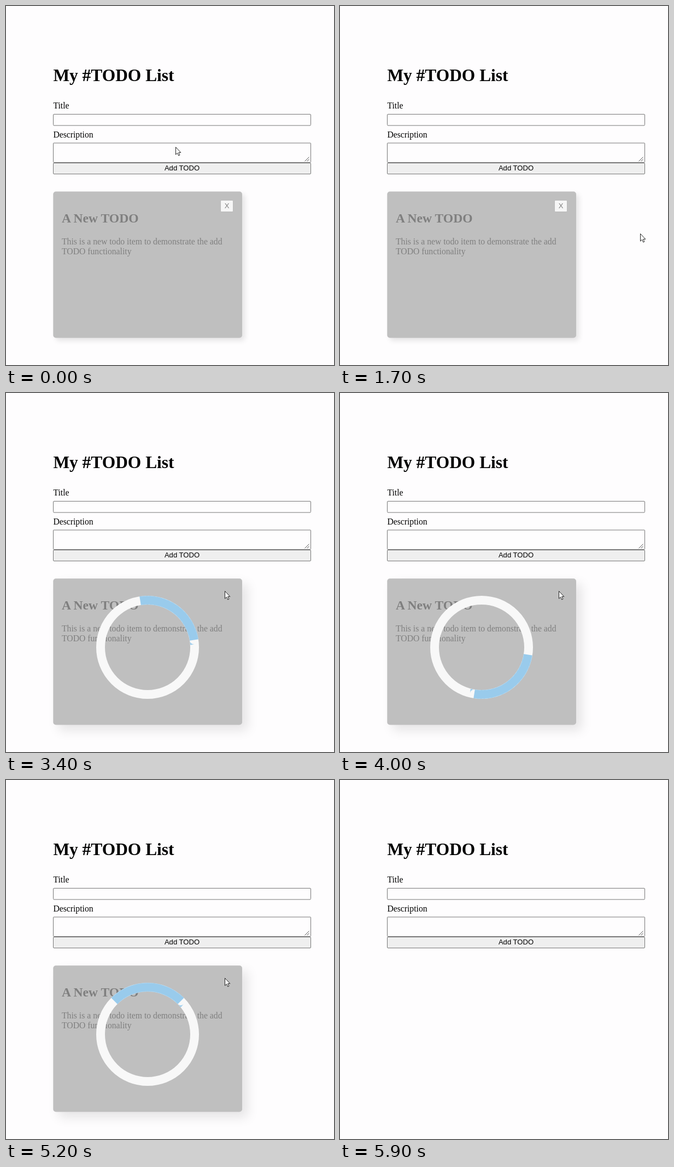
An HTML page that plays this animation: 600 px wide and 655 px high, repeating every 7.1 s.

```html
<!DOCTYPE html>
<html lang="en">
<head>
<meta charset="utf-8">
<title>My #TODO List</title>
<style>
  html, body { margin: 0; width: 100%; height: 100%; overflow: hidden; background: #fefdfe; }
  svg { display: block; width: 600px; height: 655px; }
  text { font: 15.71px "Liberation Serif", "Times New Roman", serif; }
  .h1 { font-size: 31.43px; font-weight: bold; }
  .h2 { font-size: 23.57px; font-weight: bold; }
  .label { font: 13.09px "Liberation Sans", Arial, sans-serif; text-anchor: middle; }
  .field { fill: #fefdfe; stroke: #767676; }
  .push { fill: #efefef; stroke: #767676; }
  .grip { fill: none; stroke: #555; }

  /* One loop is 7.1 s; 100 ms is about 1.408 %. */
  .card, .panel, .close, .close rect, .loader, .spin, .cursor {
    animation: 7.1s step-end infinite;
  }
  .card { opacity: .5; animation-name: card; }
  .panel { fill: #808080; animation-name: lift; animation-timing-function: linear; }
  .close { animation-name: close; }
  .close rect { animation-name: hover; }
  .loader { animation-name: loader; }
  .spin { transform-origin: 259px 464px; animation-name: spin; }
  .ring { fill: none; stroke: #f3f3f3; stroke-width: 16; }
  .arc { stroke: #3498db; stroke-dasharray: 1 3; }
  .cursor { fill: #fff; stroke: #222; stroke-linejoin: round; animation-name: move; }

  @keyframes card { 0% { visibility: visible } 74.64%, to { visibility: hidden } }
  @keyframes lift {
    0%, 30.28% { filter: drop-shadow(5px 5px 5px rgba(0, 0, 0, .2)) }
    33.8%, to { filter: drop-shadow(10px 10px 10px rgba(0, 0, 0, .2)) }
  }
  @keyframes close { 0% { opacity: 1 } 45.07%, to { opacity: 0 } }
  @keyframes hover {
    0% { fill: #efefef; stroke: #767676 }
    32.39% { fill: #e5e5e5; stroke: #4f4f4f }
    43.66%, to { fill: #f5f5f5; stroke: #8d8d8d }
  }
  @keyframes loader { 0% { opacity: 0 } 45.07%, to { opacity: 1 } }
  @keyframes spin {
    0% { transform: rotate(0deg) }
    45.07% { transform: rotate(0deg); animation-timing-function: steps(21, end) }
    74.64%, to { transform: rotate(378deg) }
  }
  @keyframes move {
    0% { transform: translate(310px, 257px) }
    1.4% { transform: translate(312px, 262px) }
    2.81% { transform: translate(318px, 272px) }
    4.22% { transform: translate(334px, 290px) }
    5.63% { transform: translate(358px, 311px) }
    7.04% { transform: translate(386px, 331px) }
    8.45% { transform: translate(414px, 348px) }
    9.85% { transform: translate(445px, 363px) }
    11.26% { transform: translate(-40px, 0) }
    23.94% { transform: translate(549px, 415px) }
    25.35% { transform: translate(509px, 411px) }
    28.16% { transform: translate(490px, 405px) }
    29.57% { transform: translate(455px, 390px) }
    30.98% { transform: translate(420px, 372px) }
    32.39% { transform: translate(396px, 360px) }
    33.8% { transform: translate(387px, 358px) }
    35.21% { transform: translate(392px, 359px) }
    36.61% { transform: translate(397px, 360px) }
    38.02% { transform: translate(400px, 361px) }
    80.28% { transform: translate(452px, 350px) }
    81.69% { transform: translate(557px, 330px) }
    83.09%, to { transform: translate(-40px, 0) }
  }
</style>
</head>
<body>
<svg viewBox="0 0 600 655">
  <text class="h1" x="86.4" y="137">My #TODO List</text>
  <text x="86.4" y="187">Title</text>
  <rect class="field" x="86.5" y="197.5" width="471" height="20.5" rx="1.5"/>
  <text x="86.4" y="239.7">Description</text>
  <rect class="field" x="86.5" y="250" width="471" height="35.5" rx="1"/>
  <path class="grip" d="M546.5 283.5l8-8M550.5 283.5l4-4"/>
  <rect class="push" x="86.5" y="286.5" width="471" height="20" rx="1.5"/>
  <text class="label" x="322" y="300.3">Add TODO</text>

  <g class="card">
    <rect class="panel" x="86.3" y="338.5" width="345.7" height="267" rx="5"/>
    <text class="h2" x="102" y="395.3">A New TODO</text>
    <text x="102" y="434.6">This is a new todo item to demonstrate the add</text>
    <text x="102" y="452.6">TODO functionality</text>
    <g class="close">
      <rect class="push" x="392.5" y="354.5" width="23" height="21" rx="1.5"/>
      <text class="label" x="404" y="369.3">X</text>
    </g>
    <g class="loader">
      <circle class="ring" cx="259" cy="464" r="86"/>
      <g class="spin">
        <circle class="ring arc" cx="259" cy="464" r="86" pathLength="4" transform="rotate(-135 259 464)"/>
      </g>
    </g>
  </g>

  <path class="cursor" d="M.5 .5v13.6l3.1-2.9 2.1 4.8 2.2-1-2.1-4.6h4z"/>
</svg>
</body>
</html>
```
